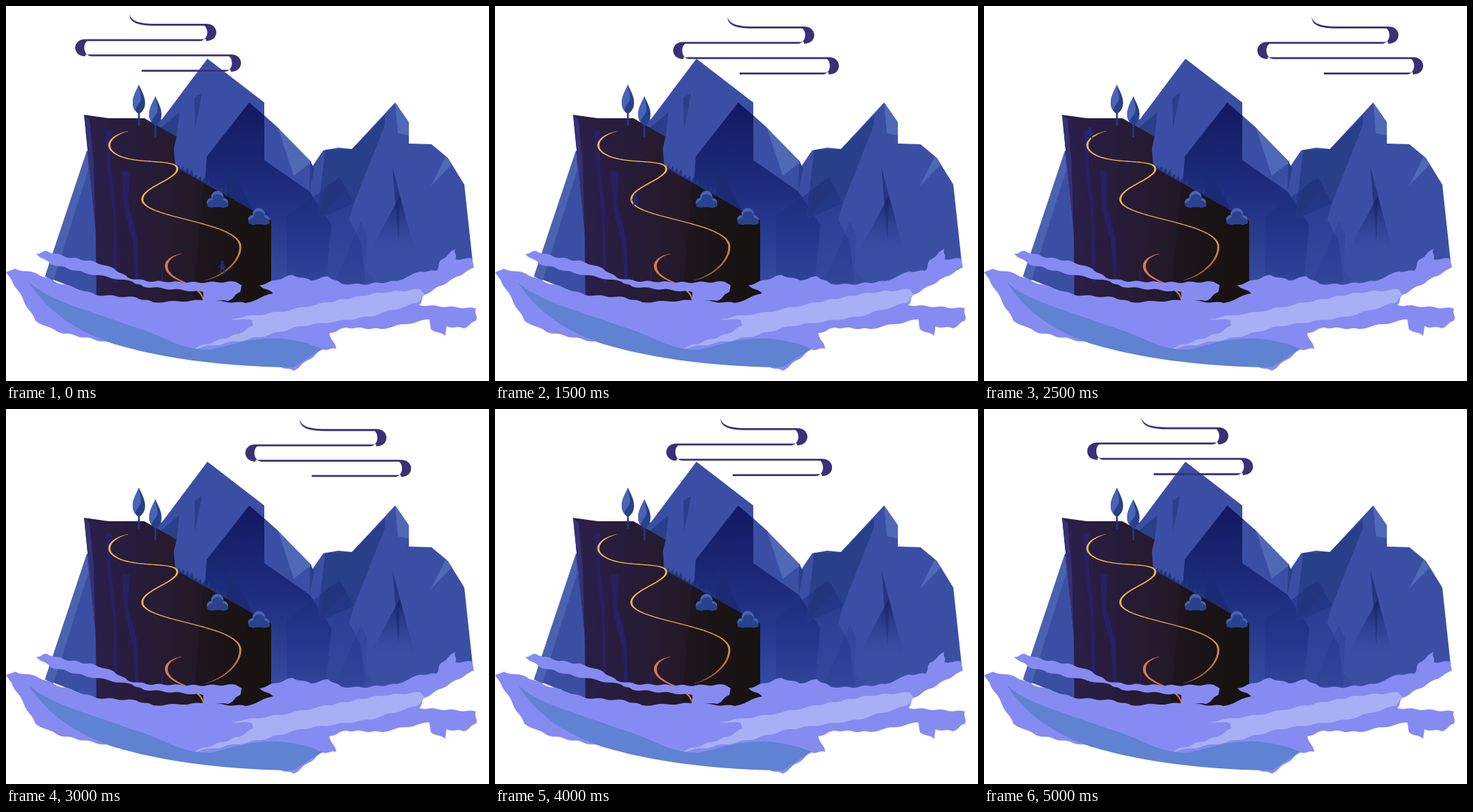
Animation of 705x548 px, one loop 5500 ms. Source, as an HTML page:

```html
<!DOCTYPE html>
<html lang="en">
<head>
<meta charset="utf-8">
<title>Mountain path</title>
<style>
html, body { margin: 0; width: 100%; height: 100%; overflow: hidden; background: #fff; }
svg { display: block; }
.rock { fill: #3a4fa4; }
.shade { fill: #28408a; }
.light { fill: #5069b6; }
</style>
</head>
<body>
<svg width="705" height="548" viewBox="0 0 705 548">
  <defs>
    <linearGradient id="peak" gradientUnits="userSpaceOnUse" x1="0" y1="141" x2="0" y2="408">
      <stop offset="0" stop-color="#131960"/>
      <stop offset=".45" stop-color="#1c2b7c"/>
      <stop offset="1" stop-color="#364ba2"/>
    </linearGradient>
    <linearGradient id="fade" x1="0" y1="0" x2="0" y2="1">
      <stop offset="0" stop-color="#142264" stop-opacity=".9"/>
      <stop offset="1" stop-color="#2a3f98" stop-opacity="0"/>
    </linearGradient>
    <linearGradient id="low" x1="0" y1="0" x2="0" y2="1">
      <stop offset="0" stop-color="#1c2e80" stop-opacity=".6"/>
      <stop offset="1" stop-color="#1c2e80" stop-opacity=".22"/>
    </linearGradient>
    <linearGradient id="cliff" gradientUnits="userSpaceOnUse" x1="114" y1="0" x2="387" y2="0">
      <stop offset="0" stop-color="#2a1f4b"/>
      <stop offset=".5" stop-color="#251a2c"/>
      <stop offset="1" stop-color="#191410"/>
    </linearGradient>
    <linearGradient id="gold" gradientUnits="userSpaceOnUse" x1="0" y1="182" x2="0" y2="402">
      <stop offset="0" stop-color="#f9c04b"/>
      <stop offset=".5" stop-color="#f3b04e"/>
      <stop offset=".8" stop-color="#c98450"/>
      <stop offset="1" stop-color="#96583c"/>
    </linearGradient>
    <g id="tree">
      <path d="M0 30V60" stroke="#23397f" stroke-width="2.6"/>
      <path class="shade" d="M0 0C5 11 9 17 9 27Q9 37 0 43Q-9 37 -9 27C-9 17-5 11 0 0Z"/>
      <path fill="#4964b6" d="M0 0C1 10 4 14 3 21C1 29-5 31-5 38Q-9 34-9 27C-9 17-5 11 0 0Z"/>
    </g>
    <g id="puffs">
      <circle cy="-3" r="9"/><circle cx="-9" cy="5" r="6.500"/><circle cx="9" cy="5" r="6.500"/>
    </g>
    <g id="bush">
      <use href="#puffs" fill="#4763b5"/>
      <use href="#puffs" fill="#2a418d" transform="translate(.5 3.2) scale(.9 .85)"/>
      <rect x="-15" y="5" width="31" height="7" rx="3.500" fill="#2a418d"/>
    </g>
    <path id="road" d="M178 183C150 190 143 206 160 216C186 233 250 222 250 238C250 253 198 265 199 283C201 311 342 315 342 352C342 375 313 397 289 401"/>
    <path id="branch" d="M256 362C230 368 228 385 245 396C256 404 288 412 288 432"/>
  </defs>

  <path class="rock" d="M294 77L377 141V160L397 178L446 236V425H132L57 395L118 212L228 165Z"/>
  <path fill="#4a62b0" d="M118 212L120 240L69 402L57 395Z"/>
  <path class="shade" d="M275 134L286 127L282 150L276 178ZM253 155L214 188L249 193Z"/>
  <path class="rock" d="M446 236L463 211L485 207L505 209L568 141L588 170V201L621 202L645 222L669 261L682 382L630 410H440Z"/>
  <path fill="url(#peak)" d="M355 141L377 160V225L443 271L475 320L466 410H280L293 220Z"/>
  <path class="rock" d="M377 160L397 178L446 233L443 271L377 225Z"/>
  <path class="light" d="M397 178L446 228L420 248Z"/>
  <path class="shade" d="M444 226L450 238L443 271ZM466 210L505 209L553 160V174L508 288L454 312Z"/>
  <path fill="url(#low)" d="M410 307L487 251L508 288L501 312L518 345L525 408H410Z"/>
  <path fill="#22347d" d="M454 312L468 263L487 251L497 266Z"/>
  <path class="light" d="M568 141L588 170V189L572 186ZM642 220L651 231L620 263Z"/>
  <path fill="#24377f" d="M564 235L575 277L573 345Z"/>
  <path fill="url(#fade)" d="M575 277L598 364H531L537 348Z"/>
  <path fill="url(#low)" opacity=".5" d="M518 315L527 335L525 385L541 404H480Z"/>
  <path id="grass" fill="#22347f"/>
  <path fill="#1b2a74" d="M325 230L360 298L322 280Z"/>

  <path fill="url(#cliff)" d="M114 159L150 164H202L249 191L245 208L247 235L387 314V406L391 420V440H132L131 330Z"/>
  <path fill="#120f0c" opacity=".35" d="M288 258L387 314V440H272Z"/>
  <path fill="#353074" d="M114 159L122 166L128 230L133 420L131 330Z"/>
  <g fill="#282064">
    <path d="M145 182H154L153 235L160 290L163 404H158L156 300L148 240Z"/>
    <path d="M169 241L181 242L178 288L192 340L194 404H189L185 345L173 300Z"/>
    <path d="M227 385H229V404H227Z"/>
  </g>
  <path id="roadInk" fill="url(#gold)"/>
  <path id="branchInk" fill="#d9774a"/>
  <use href="#tree" x="194" y="115"/>
  <use href="#tree" x="218" y="132"/>
  <use href="#bush" x="308.500" y="282"/>
  <use href="#bush" x="369" y="307"/>

  <g id="walker" fill="#1d2b78" stroke="#1d2b78" stroke-linecap="round">
    <circle cy="-17.500" r="2" stroke="none"/>
    <path stroke="none" d="M-3 -15L2 -15.500L3.500 -7H-2.500Z"/>
    <path fill="none" stroke-width="2" d="M-1 -8L-2.500 -1M2 -8L3 -1"/>
    <path fill="none" stroke-width="1.300" d="M-2 -13L-5 -9M2 -13L4.500 -9"/>
  </g>

  <g fill="#868bf2"><path id="body"/><path id="wisp"/></g>
  <path id="glow" fill="#a8b0f5"/>
  <path fill="#5f82d2" d="M33 403C62 432 130 447 180 467C235 482 250 503 300 502C335 494 365 482 410 487Q440 491 461 501Q440 515 420 528C310 527 220 513 155 493C90 470 55 438 33 403Z"/>

  <g id="wind"><path id="windInk" fill="#3a3077"/></g>
</svg>
<script>
const byId = id => document.getElementById(id);
const shape = (id, d) => byId(id).setAttribute("d", d);

// Closed outline through key points, with a slight ripple along each edge
function ripple(text, height = 1) {
  const keys = text.trim().split(/\s+/).map(pair => pair.split(",").map(Number));
  const out = [];
  keys.forEach(([x, y], i) => {
    const [x2, y2] = keys[(i + 1) % keys.length];
    const dx = x2 - x, dy = y2 - y, len = Math.hypot(dx, dy);
    const waves = Math.round(len / 30), parts = waves * 6 || 1;
    for (let k = 0; k < parts; k++) {
      const t = k / parts, off = height * Math.sin(2 * Math.PI * waves * t) / len;
      out.push(`${(x + dx * t - dy * off).toFixed(1)} ${(y + dy * t + dx * off).toFixed(1)}`);
    }
  });
  return "M" + out.join("L") + "Z";
}

// Pen stroke along a path: thin where level, thick where upright, tapered ends
function ribbon(path, thin, thick) {
  const total = path.getTotalLength(), left = [], right = [];
  for (let s = 0; s <= total; s += 2) {
    const p = path.getPointAtLength(s);
    const a = path.getPointAtLength(Math.max(0, s - 1)), b = path.getPointAtLength(s + 1);
    const len = Math.hypot(b.x - a.x, b.y - a.y) || 1;
    const ux = (b.x - a.x) / len, uy = (b.y - a.y) / len;
    const taper = Math.min(1, .3 + s / 30, .3 + (total - s) / 30);
    const half = (thin + (thick - thin) * uy * uy) * taper / 2;
    left.push(`${p.x - uy * half} ${p.y + ux * half}`);
    right.unshift(`${p.x + uy * half} ${p.y - ux * half}`);
  }
  return "M" + left.concat(right).join("L") + "Z";
}

// Level lines joined by thick crescents on alternating sides
function scroll(turns) {
  const row = i => 26 + 22.4 * i, bar = 2.8;
  let d = "M180.500 12C182 20 190 26 218 26V28.800C191 29 180 23 180.500 12Z";
  for (let i = 0; i + 1 < turns.length; i++) {
    const y = row(i);
    d += `M${turns[i]} ${y}H${turns[i + 1]}V${y + bar}H${turns[i]}Z`;
    if (i + 2 === turns.length) break;
    const x = turns[i + 1], s = i % 2 ? -1 : 1, end = row(i + 1) + bar;
    d += `M${x} ${y}C${x + 20 * s} ${y} ${x + 20 * s} ${end} ${x} ${end}H${x - 8 * s}`
       + `C${x + 5 * s} ${end - 2} ${x + 5 * s} ${y + 2} ${x - 8 * s} ${y}Z`;
  }
  return d;
}

function grass(count) {
  let d = "M247 238";
  for (let i = 0; i < count; i++) {
    const x = 250 + i * 6.2, y = 238 + i * 3.5;
    d += `L${x + 3.4} ${y - 6 - i * 5 % 4 * 1.6}L${x + 5} ${y + 1}`;
  }
  return d + "L335 290Z";
}

shape("body", ripple(`0,389 13,384 45,391 70,402 131,422 190,426 215,433 288,430 350,434
  390,420 370,408 418,393 445,401 470,395 490,406 520,407 570,402 605,388 628,387 635,371
  656,355 656,370 680,369 683,382 611,422 603,437 686,442 686,460 668,471 643,468 641,482
  620,472 618,458 547,472 497,470 472,478 482,501 462,502 420,533 400,527 155,493 75,476
  43,460 8,400`));
shape("wisp", ripple(`44,362 60,358 85,366 130,374 158,384 178,397 205,402 280,404 335,403
  344,408 342,418 324,431 288,431 288,418 200,410 185,403 115,390 65,377`));
shape("glow", ripple(`268,502 340,479 361,467 359,459 328,457 400,447 470,433 545,419 605,414
  611,422 600,434 530,454 430,468 370,484`));
shape("grass", grass(13));
shape("windInk", scroll([215, 292, 116, 328, 198]));

const road = byId("road"), wind = byId("wind"), walker = byId("walker");
shape("roadInk", ribbon(road, 1.3, 3));
shape("branchInk", ribbon(byId("branch"), 1.5, 4.2));

const STEP = 500, STEPS = 11, CLIMB = 5;
const drift = [0, 11, 60, 159, 242, 298];
const move = (el, x, y) => el.setAttribute("transform", `translate(${x} ${y})`);

function draw(time) {
  const n = Math.floor(time / STEP) % STEPS;
  const back = (STEPS - n) / (STEPS - CLIMB);
  if (n <= CLIMB) move(wind, drift[n], n < 3 ? 0 : n === CLIMB - 1 ? 6 : 4);
  else move(wind, drift[CLIMB] * back, 4 * back);

  // The climber picks up speed over two steps, then keeps pace
  walker.style.display = n <= CLIMB ? "" : "none";
  const climbed = 29 + 101.5 * (n < 2 ? n * n / 4 : n - 1);
  const p = road.getPointAtLength(road.getTotalLength() - climbed);
  move(walker, p.x, p.y + 1);
}

const start = performance.now();
function tick() {
  draw(performance.now() - start);
  requestAnimationFrame(tick);
}
tick();
</script>
</body>
</html>
```
